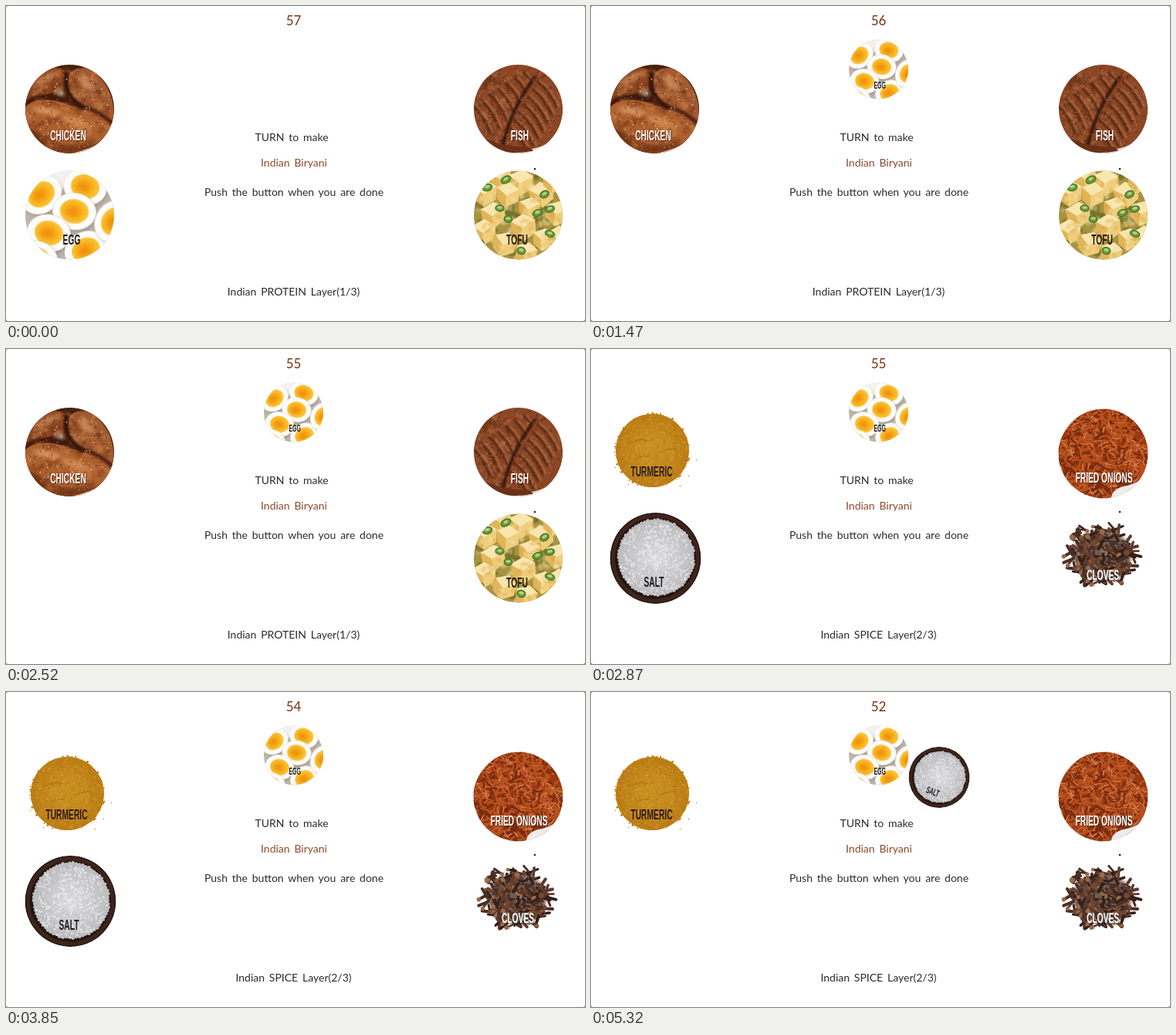
Animation, 750 px wide and 408 px high, one loop 5390 ms. Source, as an HTML page:

```html
<!DOCTYPE html>
<html lang="en">
<head>
<meta charset="utf-8">
<title>Biryani layers</title>
<style>
html, body { margin: 0; width: 100%; height: 100%; overflow: hidden; background: #fff; }
svg { display: block; width: 100vw; height: 100vh; }
.copy { font: 400 14px Lato, "Open Sans", sans-serif; word-spacing: 2.2px; text-anchor: middle; fill: #2b2b2b; }
.copy .warm { fill: #8a4a2c; }
.copy .count { font-size: 17px; fill: #7a3213; }
.name { font: bold 18px "Liberation Sans", Arial, sans-serif; text-anchor: middle; }
</style>
</head>
<body>
<svg id="stage" viewBox="0 0 750 408" preserveAspectRatio="none">
  <defs>
    <filter id="soft" x="-50%" y="-50%" width="200%" height="200%"><feGaussianBlur stdDeviation="2.5"/></filter>
    <filter id="blur" x="-50%" y="-50%" width="200%" height="200%"><feGaussianBlur stdDeviation="1"/></filter>
    <radialGradient id="yolk" cx=".47" cy=".5">
      <stop offset="0" stop-color="#f39a12"/><stop offset=".5" stop-color="#f7ab18"/><stop offset="1" stop-color="#fbc536"/>
    </radialGradient>
    <radialGradient id="grains"><stop offset="0" stop-color="#dededf"/><stop offset="1" stop-color="#bdbdc0"/></radialGradient>
    <radialGradient id="powder"><stop offset=".3" stop-color="#c98e20"/><stop offset="1" stop-color="#bb7d14"/></radialGradient>
  </defs>
  <rect width="750" height="408" fill="#8a8a8a"/>
  <rect width="750" height="408" rx="3" fill="#fff"/>
  <g id="food"></g>
  <circle cx="685" cy="211" r="1.3" fill="#222"/>
  <g class="copy">
    <text id="count" class="warm count" x="372.5" y="24.5"></text>
    <text x="370" y="175">TURN to make</text>
    <text class="warm" x="373" y="208">Indian Biryani</text>
    <text x="373" y="246">Push the button when you are done</text>
    <text id="layer" x="372.5" y="375"></text>
  </g>
</svg>
<script>
const LOOP = 5390;
const EGG_PICKED = 350, SPICE_STARTS = 2660, SALT_PICKED = 4830, FIRST_TICK = 1000;
const byId = id => document.getElementById(id);

let seed = 11;
const rnd = (a = 0, b = 1) => {
  seed = (seed * 16807) % 2147483647;
  return a + (b - a) * seed / 2147483647;
};
const inDisc = (rx, ry = rx) => {
  const a = rnd(0, 2 * Math.PI), d = Math.sqrt(rnd());
  return [rx * d * Math.cos(a), ry * d * Math.sin(a)];
};

function add(parent, tag, attrs, text) {
  const node = document.createElementNS('http://www.w3.org/2000/svg', tag);
  for (const key in attrs) node.setAttribute(key, attrs[key]);
  if (text) node.textContent = text;
  return parent.appendChild(node);
}
const circle = (g, cx, cy, r, fill) => add(g, 'circle', { cx, cy, r, fill });
const shape = (g, d, fill, extra) => add(g, 'path', { d, fill, ...extra });
const blob = (g, cx, cy, rx, ry, turn, fill, extra) =>
  add(g, 'ellipse', { rx, ry, fill, transform: `translate(${cx} ${cy}) rotate(${turn})`, ...extra });
const glow = (g, cx, cy, rx, ry, turn, fill, opacity) =>
  blob(g, cx, cy, rx, ry, turn, fill, { opacity, filter: 'url(#soft)' });

// Many short bent strokes of one colour, as a single path.
function strokes(g, n, radius, stroke, width, length, opacity = 1, extra) {
  let d = '';
  for (let i = 0; i < n; i++) {
    const [x, y] = inDisc(radius), a = rnd(0, 6.28), bend = a + rnd(-.8, .8);
    d += `M${x} ${y}q${length / 2 * Math.cos(bend)} ${length / 2 * Math.sin(bend)} ${length * Math.cos(a)} ${length * Math.sin(a)}`;
  }
  shape(g, d, 'none', { stroke, 'stroke-width': width, 'stroke-linecap': 'round', opacity, ...extra });
}
const mottle = (g, n, color, size, opacity) =>
  strokes(g, n, 55, color, size, size, opacity, { filter: 'url(#blur)' });

// A food centred on its own origin: a clipped drawing with its name above it.
function food(id, x, y, r, draw, name, nx, ny, fill, shadow) {
  const g = add(byId('food'), 'g', { transform: `translate(${x} ${y})` });
  const clip = add(g, 'clipPath', { id: id + 'Clip' });
  add(clip, 'circle', { r });
  draw(add(g, 'g', { 'clip-path': `url(#${id}Clip)` }));
  const label = add(g, 'g', { class: 'name', transform: `translate(${nx} ${ny}) scale(.57 1)` });
  if (shadow) add(label, 'text', { x: 1.5, y: 1, fill: shadow }, name);
  add(label, 'text', { fill }, name);
  return g;
}

function drawChicken(g) {
  circle(g, 0, 0, 58, '#46200f');
  shape(g, 'M-60-14C-54-50-24-60-6-50C6-44-4-30-18-24C-30-16-46-16-60-8Z', '#8c4722');
  shape(g, 'M-2-36C-4-54 22-60 36-44C52-30 62-4 54 22C44 14 34 6 18 2C0-4-6-18-2-36Z', '#a05a30');
  shape(g, 'M-60 0C-48-16-22-14 0-5C26 2 50 12 58 30C50 56 20 62-8 58C-40 56-58 40-60 0Z', '#ad602f');
  glow(g, -12, -21, 6, 5, 30, '#b9a08d', .9);
  mottle(g, 45, '#7a3716', 6, .5);
  mottle(g, 40, '#cf8650', 5, .45);
  glow(g, -30, -40, 15, 5, -25, '#d2905f', .7);
  glow(g, 22, -33, 13, 6, 40, '#dc9c6c', .7);
  glow(g, 36, -8, 12, 5, 50, '#cb8048', .7);
  glow(g, -30, 3, 20, 5, 10, '#e0a06a', .75);
  glow(g, 10, 18, 24, 6, 22, '#da9357', .7);
  shape(g, 'M-60-5C-46-21-22-18 0-9C22-3 40 4 56 19', 'none',
    { stroke: '#3d190b', 'stroke-width': 5, opacity: .8, filter: 'url(#blur)' });
  shape(g, 'M-4-48C-8-26 0-12 18-1', 'none', { stroke: '#351509', 'stroke-width': 6, filter: 'url(#blur)' });
  glow(g, -44, 40, 18, 10, 50, '#5f280f', .8);
  glow(g, 4, 52, 42, 6, -4, '#5f280f', .7);
  strokes(g, 100, 55, '#612811', 1.3, 3.5, .5);
  strokes(g, 90, 55, '#e9b286', 1, 2, .55);
  strokes(g, 22, 52, '#f9e0c8', 1.1, 1, .8);
  shape(g, 'M-14 60Q20 57 50 38V60Z', '#efe9e4');
}

// Grill marks: dark furrows, each with a lit ridge beside it.
function grill(g, n, x, y, stepX, stepY, run) {
  for (let i = 0; i < n; i++) {
    const at = dx => `M${x + i * stepX + dx} ${y + i * stepY}${run}`;
    shape(g, at(0), 'none', { stroke: '#47200f', 'stroke-width': 3.2, opacity: .8, filter: 'url(#blur)' });
    shape(g, at(4), 'none', { stroke: '#c9875c', 'stroke-width': 2, opacity: .65, filter: 'url(#blur)' });
  }
}

function drawFish(g) {
  circle(g, 0, 0, 58, '#8a4625');
  mottle(g, 50, '#5f2a13', 5, .5);
  mottle(g, 45, '#b56f45', 5, .5);
  grill(g, 7, -60, -6, 11, -7, 'q14 12 24 38');
  shape(g, 'M-20 50Q-8 2 24-42Q36-46 46-30Q62 0 60 28Q46 46 18 52Z', '#8b4726');
  shape(g, 'M-20 48Q-10 0 22-42', 'none', { stroke: '#36160a', 'stroke-width': 4, filter: 'url(#blur)' });
  grill(g, 7, -12, 24, 6, -10, 'q12 6 26 34');
  strokes(g, 150, 55, '#4f210e', 1.2, 3, .5);
  strokes(g, 130, 54, '#cf9468', .9, 2.5, .5);
  shape(g, 'M-60-16L-46-44L-20-60H-60Z', '#efebe7');
  shape(g, 'M-46 36Q-18 55 16 52Q40 48 58 28V60H-46Z', '#ece6e0');
  shape(g, 'M-56 30Q-28 50 14 49L20 54Q-10 60-36 52Z', '#6a3018');
}

function drawEgg(g) {
  circle(g, 0, 0, 58, '#bdb5ab');
  shape(g, 'M-60-60H4L-14-24L-60-6ZM30 60L60 20V60Z', '#f4f2f0');
  const halves = [[-37, -27, -40], [20, -37, 15], [6, -5, 10], [-27, 23, 15], [21, 45, -25], [57, 8, -60], [-44, 57, 10]];
  for (const [x, y, turn] of halves) {
    glow(g, x + 2, y + 3, 27, 24, turn, '#857c72', .5);
    blob(g, x, y, 28, 23.5, turn, '#fdfcfa', { stroke: '#ebe6df', 'stroke-width': 1 });
    blob(g, x, y, 18.5, 15.5, turn, 'url(#yolk)', { stroke: '#f8d077', 'stroke-width': 1 });
    glow(g, x - 3, y + 1, 8, 5, turn, '#ea8509', .5);
  }
}

function drawTofu(g) {
  circle(g, 0, 0, 58, '#a89440');
  mottle(g, 45, '#5f6420', 7, .7);
  mottle(g, 30, '#e2cf92', 6, .7);
  const cubes = [[-24, -50], [3, -44], [-14, -28], [29, -28], [-44, -30], [46, -46], [14, -10], [50, -4], [-33, -2],
    [-45, 20], [6, 14], [32, 30], [52, 28], [-18, 36], [10, 48]];
  for (const [x, y] of cubes) {
    const turn = rnd(-14, 14), s = rnd(1.05, 1.25);
    const cube = add(g, 'g', { transform: `translate(${x} ${y}) rotate(${turn}) scale(${s})`, 'stroke-linejoin': 'round' });
    shape(cube, 'M-12-6L2-12L13-5L-1 3Z', '#f9e6ae', { stroke: '#f9e6ae' });
    shape(cube, 'M-12-6L-1 3V15L-11 7Z', '#e2b558', { stroke: '#e2b558' });
    shape(cube, 'M-1 3L13-5L12 8L-1 15Z', '#efce7c', { stroke: '#efce7c' });
  }
  mottle(g, 30, '#d39a38', 4, .35);
  mottle(g, 30, '#fff1c6', 4, .4);
  const rings = [[-16, -46], [34, -27], [-24, -9], [25, -3], [-13, 5], [41, 24], [4, 46], [41, -8], [-50, 36], [-40, -36]];
  for (const [x, y] of rings) {
    const turn = rnd(-40, 40);
    blob(g, x, y, rnd(5, 7), rnd(3.5, 5), turn, '#6a9a3c', { stroke: '#3f7426', 'stroke-width': 1.2 });
    blob(g, x, y - 1, 3.2, 1.8, turn, '#bccf82');
  }
}

function drawTurmeric(g) {
  circle(g, 0, 0, 47.5, 'url(#powder)');
  for (let i = 0; i < 90; i++) {
    const a = rnd(0, 6.28), d = rnd(45, 49);
    circle(g, d * Math.cos(a), d * Math.sin(a), rnd(.4, 1.6), '#bb7f18');
  }
  for (const [x, y] of [[57, 12], [47, 33], [-31, 44], [-48, 22], [36, 46]]) circle(g, x, y, .7, '#a8792d');
  strokes(g, 130, 45, '#a96f10', 1.3, 3, .45);
  strokes(g, 130, 45, '#ddaa43', 1.2, 2.5, .5);
  shape(g, 'M-30-8q14-10 24-4M8 4q12-8 24-6M-22 12q8-6 18-4', 'none', { stroke: '#9d6710', 'stroke-width': 1.5, opacity: .5 });
}

function drawSalt(g) {
  circle(g, 0, 0, 59, '#24140f');
  add(g, 'circle', { r: 55, fill: 'none', stroke: '#3c251c', 'stroke-width': 5 });
  circle(g, 1, -1, 49, 'url(#grains)');
  for (let i = 0; i < 70; i++) {
    const a = i * Math.PI / 35;
    circle(g, 1 + 48.5 * Math.cos(a), -1 + 48.5 * Math.sin(a), rnd(1, 2.6), '#bebdbf');
  }
  strokes(g, 300, 47, '#f2f2f4', 1.8, 2, .65);
  strokes(g, 200, 47, '#9e9ea3', .9, 1.8, .45);
}

function drawOnions(g) {
  circle(g, 0, 0, 58, '#9a3a13');
  for (let i = 0; i < 3; i++) {
    strokes(g, 75, 56, '#742a0e', 2, 11);
    strokes(g, 80, 56, '#b9521f', 2.2, 13);
    strokes(g, 42, 55, '#d87c49', 1.3, 9);
  }
  shape(g, 'M-60-4Q-52-40-14-60H-60Z', '#dedbd8');
  shape(g, 'M-60 24Q-46 42-18 60H-60Z', '#e6e1dd');
  shape(g, 'M10 60Q10 46 28 42Q46 40 60 22V60Z', '#efebe8');
}

function drawCloves(g) {
  glow(g, -1, -3, 38, 30, 0, '#3a251d', .75);
  for (let i = 0; i < 170; i++) {
    const [x, y] = inDisc(46, 39), length = rnd(9, 16);
    const clove = add(g, 'g', { transform: `translate(${x - 2} ${y - 3}) rotate(${rnd(0, 360)})` });
    const tone = ['#33201a', '#4a2e24', '#5d3b2d'][i % 3];
    shape(clove, `M${-length / 2} 0H${length / 2}`, 'none', { stroke: tone, 'stroke-width': rnd(2.5, 4.2), 'stroke-linecap': 'round' });
    if (i % 2) circle(clove, length / 2, 0, rnd(2.2, 3.8), i % 4 > 1 ? '#9a6a4b' : '#74482f');
  }
  strokes(g, 25, 42, '#b78b6b', 1, 2);
}

const protein = [
  food('chicken', 82.5, 133.5, 57.5, drawChicken, 'CHICKEN', -2, 40, '#fff', '#4a2010'),
  food('fish', 663.5, 133.5, 57.5, drawFish, 'FISH', 2, 40, '#fff', '#4a2010'),
  food('tofu', 663.5, 271, 57.5, drawTofu, 'TOFU', -1.5, 38, '#1d1a12')
];
const spice = [
  food('turmeric', 79.5, 131.5, 60, drawTurmeric, 'TURMERIC', -1, 33, '#2b1a22'),
  food('onions', 663.5, 135.5, 58, drawOnions, 'FRIED ONIONS', 1, 37, '#fff', '#4a2418'),
  food('cloves', 663, 269, 60, drawCloves, 'CLOVES', 0, 30, '#fff', '#77706c')
];
const egg = food('egg', 82.5, 271, 57.5, drawEgg, 'EGG', 2.5, 38, '#1d1a16');
const salt = food('salt', 83.5, 271, 59, drawSalt, 'SALT', -2, 36.5, '#1c1c1e');

const show = (node, on) => node.setAttribute('display', on ? 'inline' : 'none');
const place = (node, x, y, scale, turn) =>
  node.setAttribute('transform', `translate(${x} ${y}) rotate(${turn}) scale(${scale})`);

function render(t) {
  const spicing = t >= SPICE_STARTS;
  protein.forEach(node => show(node, !spicing));
  spice.forEach(node => show(node, spicing));
  show(salt, spicing);
  if (t < EGG_PICKED) place(egg, 82.5, 271, 1, 0);
  else place(egg, 372.5, 82, .67, 0);
  if (t < SALT_PICKED) place(salt, 83.5, 271, 1, 0);
  else place(salt, 451, 110.5, .67, 20);
  byId('count').textContent = 57 - Math.max(0, Math.floor((t - FIRST_TICK) / 1000) + 1);
  byId('layer').textContent = spicing ? 'Indian SPICE Layer(2/3)' : 'Indian PROTEIN Layer(1/3)';
}

const start = performance.now();
function tick() {
  render((performance.now() - start) % LOOP);
  requestAnimationFrame(tick);
}
tick();
</script>
</body>
</html>
```
